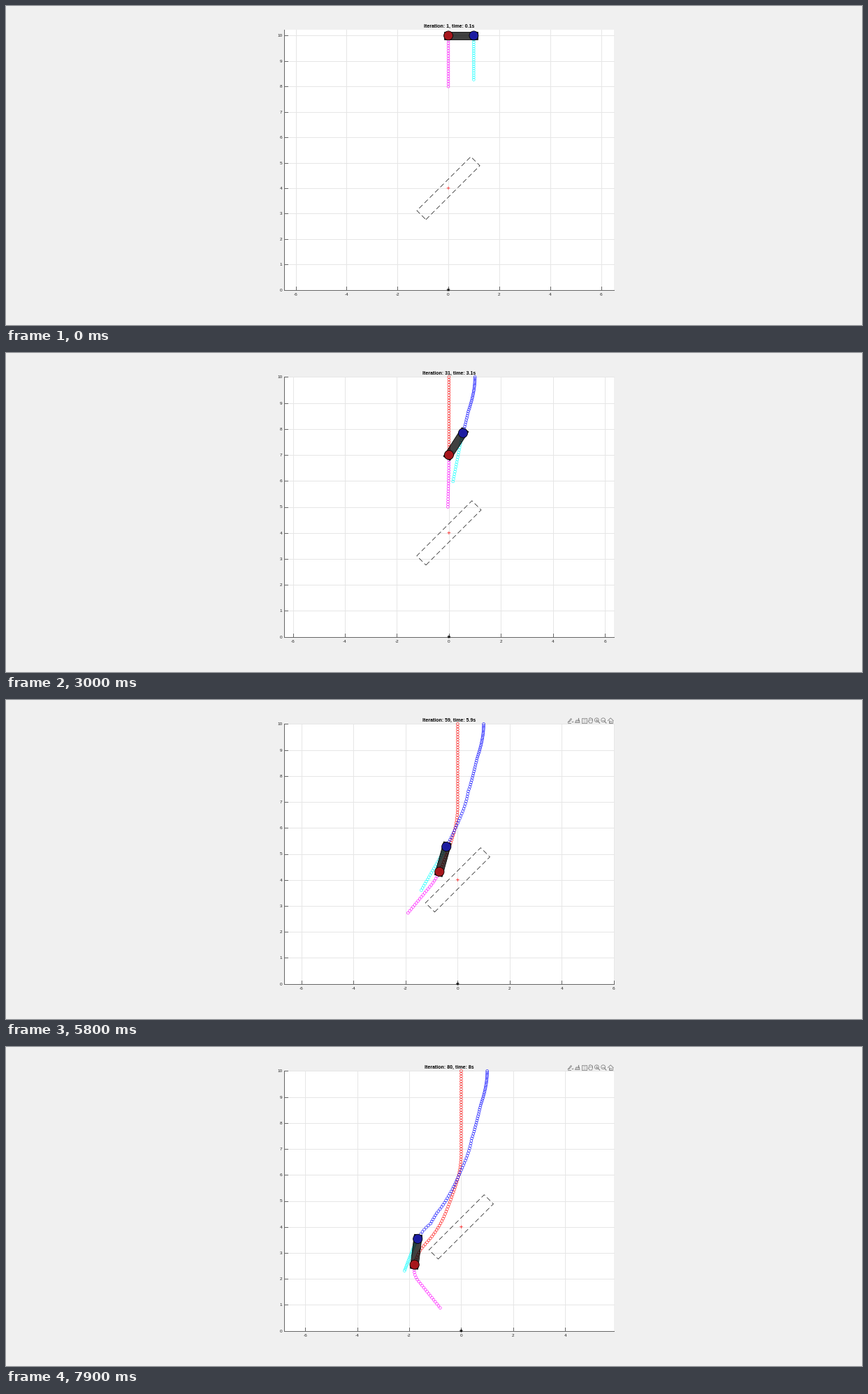
Recreate the animation shown at these times as a matplotlib script. Size 1225 px wide and 457 px high, loop 8000 ms.

```python
import numpy as np
import matplotlib.pyplot as plt
from matplotlib.animation import FuncAnimation
from matplotlib.collections import PolyCollection
from matplotlib.patches import Circle, Polygon, Rectangle

W, H, DPI = 1225, 457, 100
PX = 72 / DPI                       # points per pixel
LEFT, RIGHT, TOP, BOTTOM = 397.9, 869.9, 34.4, 406.6
MID = (LEFT + RIGHT) / 2
STEPS, HORIZON, SPEED = 80, 20, 0.1
INK, AXIS, GRID, ICON = "0.15", "0.4", "0.9", "0.5"

plt.rcParams["font.family"] = "Liberation Sans"
fig = plt.figure(figsize=(W / DPI, H / DPI), dpi=DPI, facecolor="#f0f0f0")
ax = fig.add_axes([0, 0, 1, 1])


def down(heading):
    """Unit vectors; heading is in degrees, clockwise from straight down."""
    a = np.radians(heading)
    return np.c_[-np.sin(a), -np.cos(a)]


# The front wheel rolls at constant speed; the bar turns about it
steps = np.arange(1, STEPS + 1)
steer = np.interp(steps, [33, 45, 57, 70, 72, 80], [0, 18, 22, 42, 42, 13])
front = np.vstack([(0, 10), (0, 10) + np.cumsum(SPEED * down(steer[1:]), axis=0)])
tilt = np.interp(steps, [1, 21, 36, 60, 68, 73, 80], [0, 42, 65, 75, 76, 70.5, 83])
angle = np.radians(tilt)
rear = front + np.c_[np.cos(angle), np.sin(angle)]
vel = np.gradient(rear, axis=0)
drift = np.degrees(np.arctan2(-vel[:, 0], -vel[:, 1]))

# Predictions turn from the present heading to an aim, over a given reach
front_aim = np.interp(steps, [30, 48, 60, 69, 80], [0, 26, 41, 45, -39])
front_reach = 2 - .25 * np.exp(-((steps - 69) / 4)**2)
rear_aim = np.interp(steps, [1, 20, 31, 59, 68, 80], [0, 15, 11, 30, 34, 21])
rear_reach = np.interp(steps, [1, 45, 60, 80], [1.73, 1.98, 1.93, 1.33])


def forecast(start, heading, aim, reach):
    u = (np.arange(HORIZON) + .5) / HORIZON
    turn = heading + (aim - heading) * np.minimum(1, 3 * u)
    return start + np.cumsum(reach / HORIZON * down(turn), axis=0)


def box(center, turn, x0, x1, half):
    c, s = np.cos(turn), np.sin(turn)
    corners = np.array([(x0, -half), (x1, -half), (x1, half), (x0, half)])
    return corners @ np.array([(c, s), (-s, c)]) + center


goal = box((0, 4), np.pi / 4, -1.5, 1.5, .25)
turns = np.linspace(0, 2 * np.pi, 24, endpoint=False)
RING = 1.9 * np.c_[np.cos(turns), np.sin(turns)]


def line(xs, ys, color=INK, lw=.8, **kw):
    ax.plot(xs, ys, color=color, lw=lw * PX, **kw)


def rings(p, color):
    ax.add_collection(PolyCollection(p[:, None] + RING, facecolors="none",
                                     edgecolors=color, linewidths=.55 * PX,
                                     zorder=2.5), autolim=False)


def cross(p, r, color, tilted=False):
    x, y = p
    k = r * .7 if tilted else 0
    ends = [(k, k), (k, -k)] if tilted else [(r, 0), (0, r)]
    for dx, dy in ends:
        line([x - dx, x + dx], [y - dy, y + dy], color, .65, snap=False)


def label(x, y, s, ha="center"):
    ax.text(x, y, s, size=6.4 * PX, color=INK, ha=ha, va="center")


def shape(points, **kw):
    ax.add_patch(Polygon(points, lw=.8 * PX, **kw))


def toolbar():
    # brush
    line([804.5, 808.5, 809.5, 806, 804], [31.5, 26.5, 27.5, 31.5, 32], ICON)
    line([804, 808], [32.5, 32.5], ICON)
    line([810, 811, 812], [31, 32, 31], ICON)
    # data brush
    line([818.5, 818.5], [25.5, 29], ICON, 1.2)
    shape([(816, 29), (820.5, 29), (821, 32.5), (814.5, 32.5)], fc="0.8", ec=ICON)
    # data tip
    ax.add_patch(Rectangle((824, 26), 6.5, 7, fill=False, ec=ICON, lw=.8 * PX))
    for y in (28, 30.5):
        line([825.5, 829], [y, y], ICON, .6)
    # pan hand
    shape([(835, 33), (833, 30), (834.5, 30), (834.5, 26.5), (836, 25.5),
           (839.2, 27), (839.5, 30), (838.5, 33)], fill=False, ec=ICON)
    for x in (836, 837.6):
        line([x, x], [26.5, 29], ICON, .6)
    # zoom in, zoom out
    for x in (845.3, 854.6):
        ax.add_patch(Circle((x, 28.7), 2.9, fill=False, ec=ICON, lw=.8 * PX))
        line([x + 2.1, x + 4.3], [30.8, 33], ICON, 1.1)
        line([x - 1.5, x + 1.5], [28.7, 28.7], ICON, .7)
    line([845.3, 845.3], [27.2, 30.2], ICON, .7)
    # home
    line([861.3, 865.2, 869.1], [29.6, 25.8, 29.6], ICON)
    line([862.5, 862.5, 867.9, 867.9], [29, 32.8, 32.8, 29], ICON)
    ax.add_patch(Rectangle((864.2, 30.2), 2, 2.6, fill=False, ec=ICON, lw=.6 * PX))


def draw(n):
    i = n + 1
    ax.clear()
    ax.set_axis_off()
    ax.set(xlim=(0, W), ylim=(H, 0))

    ahead = forecast(front[n], steer[n], front_aim[n], front_reach[n])
    behind = forecast(rear[n], drift[n], rear_aim[n], rear_reach[n])
    c, s = np.cos(angle[n]), np.sin(angle[n])

    # Axis limits follow the extent of the data
    top = max(10, rear[n, 1] + .22 * c + .285 * s)
    low = min(goal[:, 0].min(), ahead[:, 0].min(), behind[:, 0].min())
    high = max(goal[:, 0].max(), rear[n, 0] + .285 * c + .18 * s)
    scale = (BOTTOM - TOP) / top
    center = (low + high) / 2

    def px(p):
        p = np.atleast_2d(p)
        return np.c_[MID + (p[:, 0] - center) * scale, BOTTOM - p[:, 1] * scale]

    ax.add_patch(Rectangle((LEFT, TOP), RIGHT - LEFT, BOTTOM - TOP, fc="w", lw=0))
    xt = [(v, px((v, 0))[0, 0]) for v in range(-8, 9, 2)]
    xt = [(v, x) for v, x in xt if LEFT <= x <= RIGHT + .2]
    yt = [(v, px((0, v))[0, 1]) for v in range(11)]
    for _, x in xt:
        line([x, x], [TOP, BOTTOM], GRID, 1)
    for _, y in yt:
        line([LEFT, RIGHT], [y, y], GRID, 1)
    line([LEFT, LEFT], [TOP, BOTTOM], AXIS, 1)
    line([LEFT, RIGHT], [BOTTOM, BOTTOM], AXIS, 1)
    for v, x in xt:
        line([x, x], [BOTTOM, BOTTOM - 4.7], AXIS, 1)
        label(x, 413.6, str(v))
    for v, y in yt:
        line([LEFT, LEFT + 4.7], [y, y], AXIS, 1)
        label(395.3, y + .5, str(v), "right")

    ax.text(MID, 31.2, f"Iteration: {i}, time: {i / 10:g}s", size=7 * PX,
            weight="bold", ha="center", va="baseline", color="k")

    outline = px(np.vstack([goal, goal[:1]]))
    line(outline[:, 0], outline[:, 1], "k", .65, dashes=(10.5, 6))
    cross(px((0, 4))[0], 2, "r")
    cross(px((0, 0))[0], 2, "k")
    cross(px((0, 0))[0], 2, "k", tilted=True)

    rings(px(front[:i]), "#ff0000")
    rings(px(rear[:i]), "#0000ff")
    rings(px(ahead), "#ff00ff")
    rings(px(behind), "#00ffff")

    shape(px(box(front[n], angle[n], -.16, 1.16, .15)),
          fc=(0, 0, 0, .75), ec="k", zorder=3)
    for p, rgb in ((front[n], (.7, .08, .1)), (rear[n], (.1, .1, .68))):
        ax.add_patch(Circle(px(p)[0], .178 * scale, fc=(*rgb, .9), ec="k",
                            lw=.8 * PX, zorder=4))

    if i >= 56:
        toolbar()
    return []


anim = FuncAnimation(fig, draw, frames=STEPS, interval=100, repeat=True,
                     repeat_delay=0, init_func=lambda: draw(0), blit=False)
plt.show()
```
